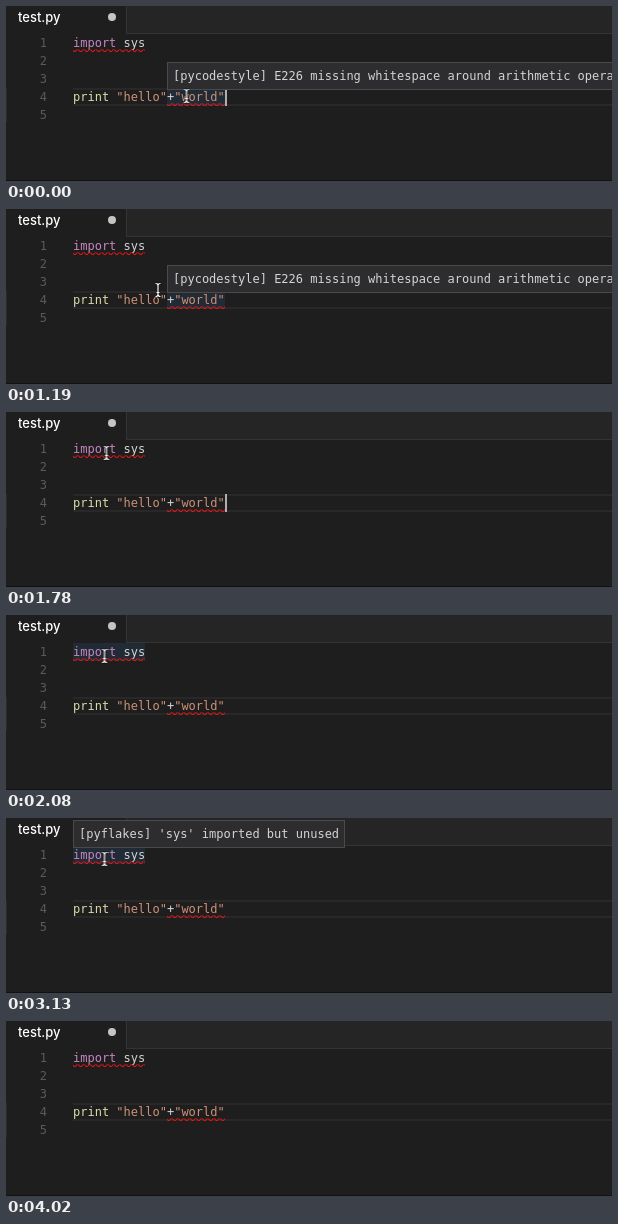
An HTML page that plays this animation: 606x175 px, repeating every 4.32 s.

```html
<!DOCTYPE html>
<html lang="en">
<head>
<meta charset="utf-8">
<title>Lint hovers in an editor</title>
<style>
  html, body { margin: 0; width: 100%; height: 100%; overflow: hidden; background: #1e1e1e; }
  .stage { position: relative; width: 606px; height: 175px; overflow: hidden; background: #1e1e1e;
    font: 12px/18px "DejaVu Sans Mono", monospace; color: #d4d4d4; white-space: pre; }
  .stage > * { position: absolute; box-sizing: border-box; }

  .tabs { left: 120px; top: 0; width: 486px; height: 28px; background: #252526;
    border-left: 1px solid #343435; border-bottom: 1px solid #343435; }
  .title { left: 12px; top: 2px; font: 500 13px/18px Inter, sans-serif; color: #fff; }
  .dirty { left: 102px; top: 7px; width: 8px; height: 8px; border-radius: 50%; background: #c5c5c5; }
  .edge { left: 0; top: 82px; width: 1px; height: 34px; background: #2b2b2b; }
  .floor { left: 0; top: 174px; width: 606px; height: 1px; background: #121212; }

  .numbers { left: 0; top: 28px; width: 41px; text-align: right; color: #5a5a5a; }
  .current { left: 67px; top: 82px; width: 539px; height: 18px; border: solid #282828; border-width: 2px 0; }
  .code { left: 67px; top: 28px; }
  .keyword { color: #c586c0; }
  .call { color: #dcdcaa; }
  .string { color: #ce9178; }

  .range { height: 18px; background: rgba(38, 79, 120, .25); }
  .tip { height: 28px; padding: 4px 5px; background: #2d2d30; border: 1px solid #4a4a4a; }
  .caret { left: 219px; top: 82px; width: 2px; height: 18px; background: #aeafad; }
  .style { left: 161px; }
  .unused { left: 67px; }
  .range.style { top: 82px; width: 58px; }
  .range.unused { top: 28px; width: 72px; }
  .tip.style { top: 56px; width: 470px; }
  .tip.unused { top: 2px; width: 272px; }
  .art { left: 0; top: 0; }

  /* hard cuts on one shared 4320 ms loop */
  .caret, .range, .tip, .pointer { animation: 4320ms step-end infinite; }
  .caret { animation-name: blink; }
  .style { animation-name: style; }
  .range.unused { animation-name: hover; }
  .tip.unused { animation-name: unused; }
  .pointer { animation-name: move; }

  @keyframes blink {
    0%, 13.88%, 37.73%, 58.56%, 82.87% { opacity: 1; }
    3.47%, 24.3%, 48.14%, 72.45%, 93.05%, 100% { opacity: 0; }
  }
  @keyframes style {
    0% { opacity: 1; }
    31.01%, 100% { opacity: 0; }
  }
  @keyframes hover {
    0%, 86.34%, 100% { opacity: 0; }
    48.14% { opacity: 1; }
  }
  @keyframes unused {
    0%, 86.34%, 100% { opacity: 0; }
    51.62% { opacity: 1; }
  }
  @keyframes move {
    0% { transform: translate(180.5px, 90px); opacity: 1; }
    27.54% { transform: translate(152px, 81px); }
    31.01% { transform: translate(141.5px, 75px); }
    34.49% { transform: translate(122.5px, 62px); }
    37.73% { transform: translate(108.5px, 46px); }
    41.2% { transform: translate(100.5px, 41px); }
    44.67% { transform: translate(98.5px, 41px); }
    82.87% { transform: translate(117.5px, 41px); }
    86.34% { transform: translate(371.5px, 75px); }
    89.81% { transform: translate(467.5px, 146px); opacity: 1; }
    93.05%, 100% { transform: translate(467.5px, 146px); opacity: 0; }
  }
</style>
</head>
<body>
<div class="stage">
  <div class="tabs"></div>
  <div class="title">test.py</div>
  <div class="dirty"></div>
  <div class="edge"></div>
  <div class="floor"></div>
  <div class="current"></div>
  <div class="range style"></div>
  <div class="range unused"></div>
  <div class="numbers">1
2
3
4
5</div>
  <div class="code"><span class="keyword">import</span> sys


<span class="call">print</span> <span class="string">"hello"</span>+<span class="string">"world"</span></div>
  <svg class="art" width="606" height="175">
    <defs>
      <pattern id="wave" width="6" height="3" patternUnits="userSpaceOnUse">
        <path d="M5.5 0 2.5 3H1.1L4.1 0ZM4 0 6 2V.6L5.4 0ZM0 2 1 3H2.4L0 .6Z" fill="#e51414"/>
      </pattern>
    </defs>
    <rect width="72" height="3" fill="url(#wave)" transform="translate(67 43)"/>
    <rect width="58" height="3" fill="url(#wave)" transform="translate(161 97)"/>
  </svg>
  <div class="caret"></div>
  <div class="tip style">[pycodestyle] E226 missing whitespace around arithmetic operator</div>
  <div class="tip unused">[pyflakes] 'sys' imported but unused</div>
  <svg class="art" width="606" height="175" fill="none">
    <g class="pointer">
      <path id="beam" d="M-2.5-6.5Q0-6.5 0-4.5Q0-6.5 2.5-6.5M0-5V5M-2.5 6.5Q0 6.5 0 4.5Q0 6.5 2.5 6.5M-1.5 2.5H1.5" stroke="#111" stroke-width="2.6"/>
      <use href="#beam" style="display:none"/>
      <path d="M-2.5-6.5Q0-6.5 0-4.5Q0-6.5 2.5-6.5M0-5V5M-2.5 6.5Q0 6.5 0 4.5Q0 6.5 2.5 6.5M-1.5 2.5H1.5" stroke="#fff" stroke-width="1.2"/>
    </g>
  </svg>
</div>
</body>
</html>
```
